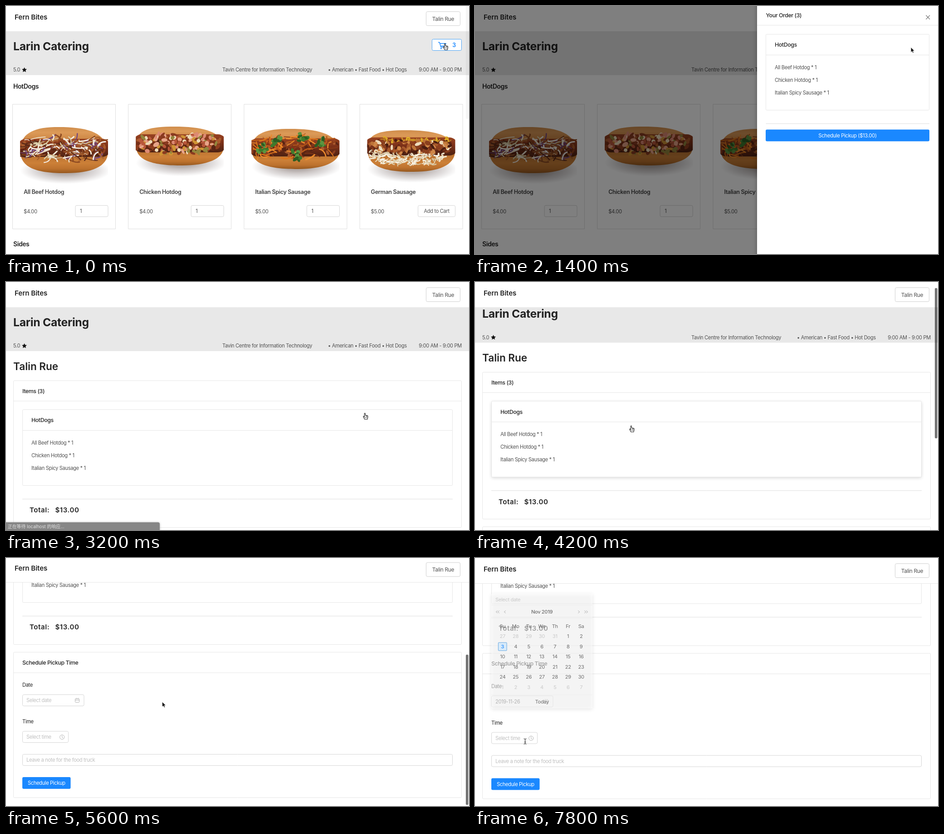
An HTML page with a canvas that plays this animation: 1021x549 px, repeating every 8000 ms.

```html
<!DOCTYPE html>
<html lang="en">
<head>
<meta charset="utf-8">
<title>Food ordering</title>
<style>
html, body { margin: 0; width: 100%; height: 100%; overflow: hidden; background: #fff; }
canvas { display: block; width: 1021px; height: 549px; }
</style>
</head>
<body>
<canvas id="stage" width="1021" height="549"></canvas>
<script>
const ctx = document.getElementById('stage').getContext('2d');
const W = 1021, H = 549, LOOP = 8000, STEP = 200;
const BLUE = '#1a88ff', INK = '#222', BODY = '#505050', HINT = '#bfbfbf', LINE = '#e6e6e6', EDGE = '#d6d6d6';
const USER = 'Talin Rue';
const ITEMS = ['All Beef Hotdog', 'Chicken Hotdog', 'Italian Spicy Sausage', 'German Sausage'];
const MAX_SCROLL = 349.5;

const clamp = (v, a = 0, b = 1) => Math.min(b, Math.max(a, v));
const progress = (t, from, to) => clamp((t - from) / (to - from));
const smooth = p => p * p * (3 - 2 * p);

// Interpolates rows of [time, ...values].
function track(keys, t) {
  let i = 0;
  while (i < keys.length - 2 && t >= keys[i + 1][0]) i++;
  const a = keys[i], b = keys[i + 1], p = smooth(progress(t, a[0], b[0]));
  return a.slice(1).map((v, k) => v + (b[k + 1] - v) * p);
}

function rng(seed) {
  return () => (seed = (seed * 16807) % 2147483647) / 2147483647;
}

// y is the middle of the capitals.
function text(str, x, y, { size = 11.1, weight = 400, color = BODY, align = 'left', gap = -0.03 } = {}) {
  ctx.font = `${weight} ${size}px Inter, "Noto Sans CJK SC", "Noto Sans CJK", sans-serif`;
  ctx.letterSpacing = `${gap * size}px`;
  ctx.textAlign = align;
  ctx.fillStyle = color;
  ctx.fillText(str, x, y + size * 0.36);
}

function box(x, y, w, h, r, fill, stroke) {
  ctx.beginPath();
  ctx.roundRect(x, y, w, h, r);
  if (fill) { ctx.fillStyle = fill; ctx.fill(); }
  if (stroke) { ctx.strokeStyle = stroke; ctx.lineWidth = 1; ctx.stroke(); }
}

function stroke(points, color, width = 1) {
  ctx.beginPath();
  points.forEach(([x, y], i) => i ? ctx.lineTo(x, y) : ctx.moveTo(x, y));
  ctx.strokeStyle = color;
  ctx.lineWidth = width;
  ctx.stroke();
}

const rule = (x1, x2, y, color = LINE) => stroke([[x1, y], [x2, y]], color);

function shadowed(color, blur, dy, draw) {
  ctx.save();
  ctx.shadowColor = color;
  ctx.shadowBlur = blur;
  ctx.shadowOffsetY = dy;
  draw();
  ctx.restore();
}

function star(x, y, r) {
  ctx.beginPath();
  for (let i = 0; i < 10; i++) {
    const a = -Math.PI / 2 + i * Math.PI / 5, d = i % 2 ? r * 0.48 : r;
    ctx.lineTo(x + d * Math.cos(a), y + d * Math.sin(a));
  }
  ctx.closePath();
  ctx.fillStyle = '#111';
  ctx.fill();
}

function header() {
  ctx.fillStyle = '#fff';
  ctx.fillRect(0, 0, W, 56);
  rule(0, W, 56.5);
  text('Fern Bites', 19, 25, { size: 15, weight: 600, color: INK, gap: 0 });
  box(926.5, 12.5, 75, 31, 3, '#fff', '#cfcfcf');
  text(USER, 964, 28.5, { size: 12, align: 'center' });
}

function hero() {
  ctx.fillStyle = '#e8e8e8';
  ctx.fillRect(0, 57, W, 96);
  text('Larin Catering', 16, 89, { size: 24.7, weight: 700, color: INK, gap: -0.01 });
  text('5.0', 16, 141.5);
  star(40.5, 141.5, 5.8);
  text('Tavin Centre for Information Technology', 477, 141.5);
  text('• American • Fast Food • Hot Dogs', 710, 141.5);
  text('9:00 AM - 9:00 PM', 1005, 141.5, { align: 'right' });
}

function cartButton() {
  box(939.5, 73.5, 65, 25, 3, '#fff', '#4aa3f5');
  stroke([[953, 80.5], [956, 80.5], [959, 91], [968, 91]], BLUE, 1.4);
  stroke([[957, 83], [970, 83], [968, 88.5], [958.5, 88.5]], BLUE, 1.4);
  ctx.fillStyle = BLUE;
  for (const x of [959.5, 967]) {
    ctx.beginPath();
    ctx.arc(x, 94, 1.5, 0, 7);
    ctx.fill();
  }
  text('3', 988, 86.5, { size: 12.5, weight: 600, color: BLUE, align: 'center' });
}

const DOGS = [
  { top: 268, bottom: 370, mid: 315, kind: 'strand', count: 150, spread: 27,
    colors: ['#efe6d3', '#74477c', '#8d4a22', '#d9cba4', '#a8602f', '#f4eee6', '#5d2b18'] },
  { top: 267, bottom: 353, mid: 305, kind: 'chunk', count: 125, spread: 22,
    colors: ['#dd8a72', '#cf9434', '#eedcb8', '#93863c', '#b9573a', '#e8a488', '#8a3a20'] },
  { top: 272, bottom: 361, mid: 314, kind: 'strand', count: 75, spread: 24,
    colors: ['#dc741c', '#ea8a2c', '#b95a1a', '#8a3a18'], leaves: true },
  { top: 275, bottom: 367, mid: 312, kind: 'chunk', count: 80, spread: 15,
    colors: ['#bd7438', '#8a3f1e', '#eedcbc', '#4a1d10', '#cf8748'], slaw: true }
];

function strand(rand, x, y, size, color) {
  const a = rand() * 6.3, dx = Math.cos(a) * size, dy = Math.sin(a) * size * 0.55;
  ctx.beginPath();
  ctx.moveTo(x - dx, y - dy);
  ctx.quadraticCurveTo(x + (rand() - 0.5) * 16, y + (rand() - 0.5) * 16, x + dx, y + dy);
  ctx.strokeStyle = color;
  ctx.lineWidth = 1.5 + rand() * 1.8;
  ctx.stroke();
}

function chunk(rand, x, y, color) {
  ctx.beginPath();
  ctx.ellipse(x, y, 3 + rand() * 5, 2 + rand() * 3, rand() * 3, 0, 7);
  ctx.fillStyle = color;
  ctx.fill();
}

function bunShadow(bottom) {
  ctx.save();
  ctx.translate(100, bottom - 6);
  ctx.scale(1, 0.3);
  const shade = ctx.createRadialGradient(0, 0, 30, 0, 0, 100);
  shade.addColorStop(0, 'rgba(80,60,55,.42)');
  shade.addColorStop(0.6, 'rgba(110,95,95,.2)');
  shade.addColorStop(1, 'rgba(130,120,120,0)');
  ctx.fillStyle = shade;
  ctx.fillRect(-100, -100, 200, 200);
  ctx.restore();
}

function bun({ top, bottom, mid }) {
  const crust = ctx.createLinearGradient(0, top, 0, bottom);
  crust.addColorStop(0, '#cf8d4c');
  crust.addColorStop(0.12, '#dc9a58');
  crust.addColorStop(0.3, '#c98240');
  crust.addColorStop(0.5, '#b06a2c');
  crust.addColorStop(0.78, '#cc8038');
  crust.addColorStop(0.9, '#bd722e');
  crust.addColorStop(1, '#96581f');
  ctx.beginPath();
  ctx.moveTo(1, mid);
  ctx.bezierCurveTo(2, mid - 28, 24, top + 1, 76, top);
  ctx.bezierCurveTo(140, top - 1, 184, top + 8, 193, mid);
  ctx.bezierCurveTo(200, bottom - 16, 160, bottom, 102, bottom);
  ctx.bezierCurveTo(45, bottom, -4, bottom - 8, 1, mid);
  ctx.fillStyle = crust;
  ctx.fill();
}

function hotdog(dog, seed) {
  const { mid, spread, colors } = dog, rand = rng(seed);
  const edge = x => 1 - 0.5 * Math.pow(Math.abs(x - 97) / 97, 3);
  ctx.save();
  ctx.beginPath();
  ctx.rect(0, 234, 194, 161);
  ctx.clip();
  bunShadow(dog.bottom);
  bun(dog);

  const meat = ctx.createLinearGradient(0, mid - 22, 0, mid + 20);
  meat.addColorStop(0, '#9a4422');
  meat.addColorStop(0.45, '#7c3118');
  meat.addColorStop(1, '#4a2012');
  box(-6, mid - 21, 206, 40, 19, meat);
  for (let i = 0; i < 60; i++) {
    const x = rand() * 190;
    chunk(rand, x, mid + (rand() * 2 - 1) * 17 * edge(x), ['#8f3f1e', '#5a2413', '#a95a2c'][i % 3]);
  }

  if (dog.slaw) {
    for (let i = 0; i < 40; i++) strand(rand, 15 + rand() * 165, mid - 19 + rand() * 6, 6, ['#dfae26', '#c98f24'][i % 2]);
    for (let i = 0; i < 150; i++) {
      const x = 8 + rand() * 164;
      strand(rand, x, mid + (15 + rand() * 25) * edge(x), 7, ['#efe4cb', '#d8c7a2', '#f7f0e0'][i % 3]);
    }
  }
  for (let i = 0; i < dog.count; i++) {
    const x = 10 + rand() * 172, y = mid + (rand() * 2 - 1) * spread * edge(x);
    const color = colors[i % colors.length];
    if (dog.kind === 'strand') strand(rand, x, y, 8 + rand() * 12, color);
    else chunk(rand, x, y, color);
  }
  if (dog.leaves) {
    for (const [x, y] of [[24, 315], [57, 300], [98, 330], [113, 290], [150, 303]]) {
      for (let i = 0; i < 9; i++) {
        chunk(rand, x + (rand() - 0.5) * 18, y + (rand() - 0.5) * 18, ['#3f7a2c', '#5b9440', '#2d5c22'][i % 3]);
      }
    }
  }
  ctx.restore();
}

function menuPage() {
  header();
  hero();
  cartButton();
  const title = { size: 14, weight: 600, color: INK };
  text('HotDogs', 16, 178, title);
  text('Sides', 16, 526.5, title);
  ITEMS.forEach((name, i) => {
    ctx.save();
    ctx.translate(14.5 + i * 255.2, 0);
    box(0, 217.5, 227, 276, 0, '#fff', '#dedede');
    ctx.translate(16.5, 0);
    hotdog(DOGS[i], 71 + i * 613);
    ctx.translate(-16.5, 0);
    text(name, 24.5, 411.5, { size: 12.6, weight: 600, color: '#444' });
    text(i < 2 ? '$4.00' : '$5.00', 24.5, 454.5, { size: 11.3 });
    if (i < 3) {
      box(138.5, 441.5, 72, 25, 3, '#fff', EDGE);
      text('1', 148.5, 454.5);
    } else {
      box(128.5, 441.5, 82, 25, 3, '#fff', EDGE);
      text('Add to Cart', 169.5, 454.5, { align: 'center' });
    }
    ctx.restore();
  });
}

// Card with a title and the three ordered items.
function orderCard(x, y, w, lift) {
  if (lift) shadowed('rgba(0,0,0,.16)', 7, 2, () => box(x, y, w, 168, 2, '#fff'));
  box(x, y, w, 168, 2, '#fff', LINE);
  rule(x, x + w, y + 46);
  text('HotDogs', x + 19.5, y + 23.5, { size: 12.3, weight: 500, color: INK });
  ITEMS.slice(0, 3).forEach((name, i) => text(name + ' * 1', x + 19.5, y + 73.5 + 28 * i));
}

function drawer(offset, hover) {
  ctx.save();
  ctx.translate(622 + offset, 0);
  shadowed('rgba(0,0,0,.3)', 10, 0, () => box(0, -10, 420, H + 20, 0, '#fff'));
  text('Your Order (3)', 19.5, 21, { size: 12.3, weight: 500, color: INK });
  rule(0, 399, 42.5);
  stroke([[372.5, 20.5], [381, 29.5]], '#777', 1.1);
  stroke([[381, 20.5], [372.5, 29.5]], '#777', 1.1);
  orderCard(19.5, 62.5, 360, false);
  rule(19.5, 380, 260.5, '#dedede');
  box(19, 273.5, 361, 26, 3, hover ? '#389dff' : BLUE);
  text('Schedule Pickup ($13.00)', 199.5, 287, { size: 11.3, color: '#fff', align: 'center' });
  ctx.restore();
}

function field(y, w, str, color = HINT) {
  box(36.5, y, w, 25, 3, '#fff', EDGE);
  text(str, 45, y + 13, { color });
}

function orderPage(scroll, lift, date) {
  ctx.save();
  ctx.translate(0, -Math.max(0, scroll - MAX_SCROLL));
  ctx.save();
  ctx.translate(0, -Math.min(scroll, MAX_SCROLL));
  hero();
  text(USER, 16, 187, { size: 22.5, weight: 600, color: INK, gap: 0 });

  const cardTitle = { size: 12.3, weight: 500, color: INK };
  box(16.5, 218.5, 988, 325, 2, '#fff', LINE);
  text('Items (3)', 36, 241.5, cardTitle);
  rule(16, 1005, 263.5);
  orderCard(36.5, 282.5, 948, lift);
  rule(36, 985, 480.5, '#dedede');
  const total = { size: 15, weight: 600, color: INK, gap: 0.04 };
  text('Total:', 52, 505, total);
  text('$13.00', 108.5, 505, total);

  box(16.5, 560.5, 988, 322, 2, '#fff', LINE);
  text('Schedule Pickup Time', 36, 583.5, cardTitle);
  rule(16, 1005, 606);
  text('Date', 36, 633.5, { color: INK });
  field(654.5, 135.5, date || 'Select date', date ? BODY : HINT);
  box(152.5, 663.5, 9, 8, 1, null, '#b5b5b5');
  rule(152, 162, 666.5, '#b5b5b5');
  stroke([[155, 661.5], [155, 664.5]], '#b5b5b5');
  stroke([[159, 661.5], [159, 664.5]], '#b5b5b5');
  text('Time', 36, 714.5, { color: INK });
  field(735.5, 101, 'Select time');
  ctx.beginPath();
  ctx.arc(123.7, 748.5, 5, 0, 7);
  ctx.strokeStyle = '#b5b5b5';
  ctx.stroke();
  stroke([[123.7, 745], [123.7, 749], [126.3, 750.5]], '#b5b5b5');
  field(786.5, 948, 'Leave a note for the food truck');
  box(36, 837, 106.5, 26, 3, BLUE);
  text('Schedule Pickup', 89.3, 850.5, { color: '#fff', align: 'center' });
  ctx.restore();
  header();
  ctx.restore();
}

function chevron(x, y, dir, color = '#999') {
  stroke([[x - dir * 1.7, y - 3], [x + dir * 1.7, y], [x - dir * 1.7, y + 3]], color);
}

function calendar(scale, alpha, hover) {
  const base = 333, center = { align: 'center' };
  const col = i => 60.7 + i * 28.9;
  ctx.save();
  ctx.translate(0, base);
  ctx.scale(1, scale);
  ctx.translate(0, -base);
  ctx.globalAlpha = alpha;
  shadowed('rgba(0,0,0,.18)', 8, 2, () => box(36, 62, 223, 271, 3, '#fff'));
  for (const y of [89.5, 120.5, 301]) rule(36, 259, y);
  ctx.globalAlpha = Math.min(1, alpha * 1.45);
  text('Select date', 45, 77, { color: HINT });
  text('Nov 2019', 147.5, 105.5, { ...center, weight: 500 });
  for (const x of [48, 52, 66]) chevron(x, 105.5, -1);
  for (const x of [229, 243, 247]) chevron(x, 105.5, 1);
  ['Su', 'Mo', 'Tu', 'We', 'Th', 'Fr', 'Sa'].forEach((d, i) => text(d, col(i), 139.5, center));
  for (let i = 0; i < 42; i++) {
    const day = i - 4, x = col(i % 7), y = 163.4 + 23.9 * Math.floor(i / 7);
    const inside = day > 0 && day <= 30;
    if (day === 3) box(x - 9.3, y - 9.5, 18.6, 19, 1, '#d4e9fb', '#4595dc');
    if (day === 26 && hover) box(x - 9.3, y - 9.5, 18.6, 19, 1, '#e6f7ff');
    text(day < 1 ? day + 31 : day > 30 ? day - 30 : day, x, y, {
      ...center,
      weight: day === 3 ? 600 : 400,
      color: day === 3 ? BLUE : inside ? BODY : HINT
    });
  }
  text('Today', 147.8, 317, center);
  ctx.restore();
}

function statusBar() {
  shadowed('rgba(0,0,0,.3)', 4, 0, () => box(-4, 532, 343, 24, 4, '#868686'));
  text('正在等待 localhost 的响应…', 4, 541, { size: 9.8, color: '#e2e2e2', gap: 0 });
}

const POINTERS = {
  hand: ['M-1.2 1c0-1.5 2.1-1.5 2.1 0v4.2c.2-1 1.9-1 2 .2.2-.9 1.8-.8 1.8.4.3-.8 1.7-.6 1.7.5v2.6c0 2-1 2.5-1 4.6h-6c-.3-1.8-2-2.8-3-5.6-.4-1.2 1-1.7 1.7-.7l.7 1.2z', '#fff', '#222'],
  arrow: ['M0 0v11l2.6-2.3 1.7 3.9 1.9-.8-1.7-3.8h3.4z', '#111', '#fff'],
  beam: ['M-3-6q2.4 0 3 1.4q.6-1.4 3-1.4M0-4.6v9.2M-3 6q2.4 0 3-1.4q.6 1.4 3 1.4M-1.5 1.5h3', null, '#222']
};

function pointer(kind, x, y) {
  const [d, fill, line] = POINTERS[kind], path = new Path2D(d);
  ctx.save();
  ctx.translate(x, y);
  if (fill) { ctx.fillStyle = fill; ctx.fill(path); }
  ctx.strokeStyle = line;
  ctx.lineWidth = kind === 'arrow' ? 0.7 : 1.1;
  ctx.stroke(path);
  if (kind === 'hand') for (const dx of [1, 2.8, 4.6]) stroke([[dx, 8], [dx, 11]], '#444', 0.7);
  ctx.restore();
}

const MOVES = [
  [0, 968, 83.5], [1300, 968, 83.5], [2150, 790, 291.5], [2500, 790, 291.5], [2900, 791.5, 290.5],
  [3500, 791.5, 290.5], [4200, 344.5, 318.5], [5700, 344.5, 318.5], [6350, 112, 318],
  [6600, 112, 318], [7100, 119, 259], [7500, 119, 259], [7800, 110.5, 406]
];
const KINDS = [
  [0, 'hand'], [1300, 'arrow'], [2000, 'hand'], [5000, 'arrow'],
  [6300, 'beam'], [6700, 'hand'], [7700, 'beam']
];
const SCROLL = [[0, 0], [4100, 0], [4600, 180], [5300, 352], [5600, 352], [5900, MAX_SCROLL], [LOOP, MAX_SCROLL]];

function scrollbar(y, length, alpha) {
  if (alpha > 0) box(1014, y, 5.5, length, 3, `rgba(0,0,0,${alpha})`);
}

function render(t) {
  ctx.fillStyle = '#fff';
  ctx.fillRect(0, 0, W, H);

  if (t < 2700) {
    menuPage();
    scrollbar(0, 250, 0.04 * (1 - progress(t, 0, 400)));
    ctx.fillStyle = `rgba(0,0,0,${0.5 * progress(t, 200, 650)})`;
    ctx.fillRect(0, 0, W, H);
    const slide = Math.pow(1 - progress(t, 350, 843), 3);
    if (slide < 1) drawer(399 * slide, t >= 2000);
  } else {
    const [scroll] = track(SCROLL, t);
    orderPage(scroll, t >= 3500 && t < 4900, t >= 7600 ? '2019-11-26' : '');
    if (t < 3600) statusBar();
    scrollbar(2 + 0.606 * Math.min(scroll, MAX_SCROLL), 333, 0.55 * progress(t, 4000, 4200) * (1 - progress(t, 6000, 6300)));
    const open = smooth(progress(t, 6450, 6650)), shut = progress(t, 7700, 8030);
    if (open > 0) calendar(0.8 + 0.2 * (open - shut), open * (1 - 1.4 * shut), t >= 6950 && t < 7700);
  }

  const kind = KINDS.filter(([start]) => t >= start).pop()[1];
  pointer(kind, ...track(MOVES, t));
}

const start = performance.now();
function loop() {
  const t = (performance.now() - start) % LOOP;
  render(Math.floor(t / STEP) * STEP);
  requestAnimationFrame(loop);
}
loop();
</script>
</body>
</html>
```
